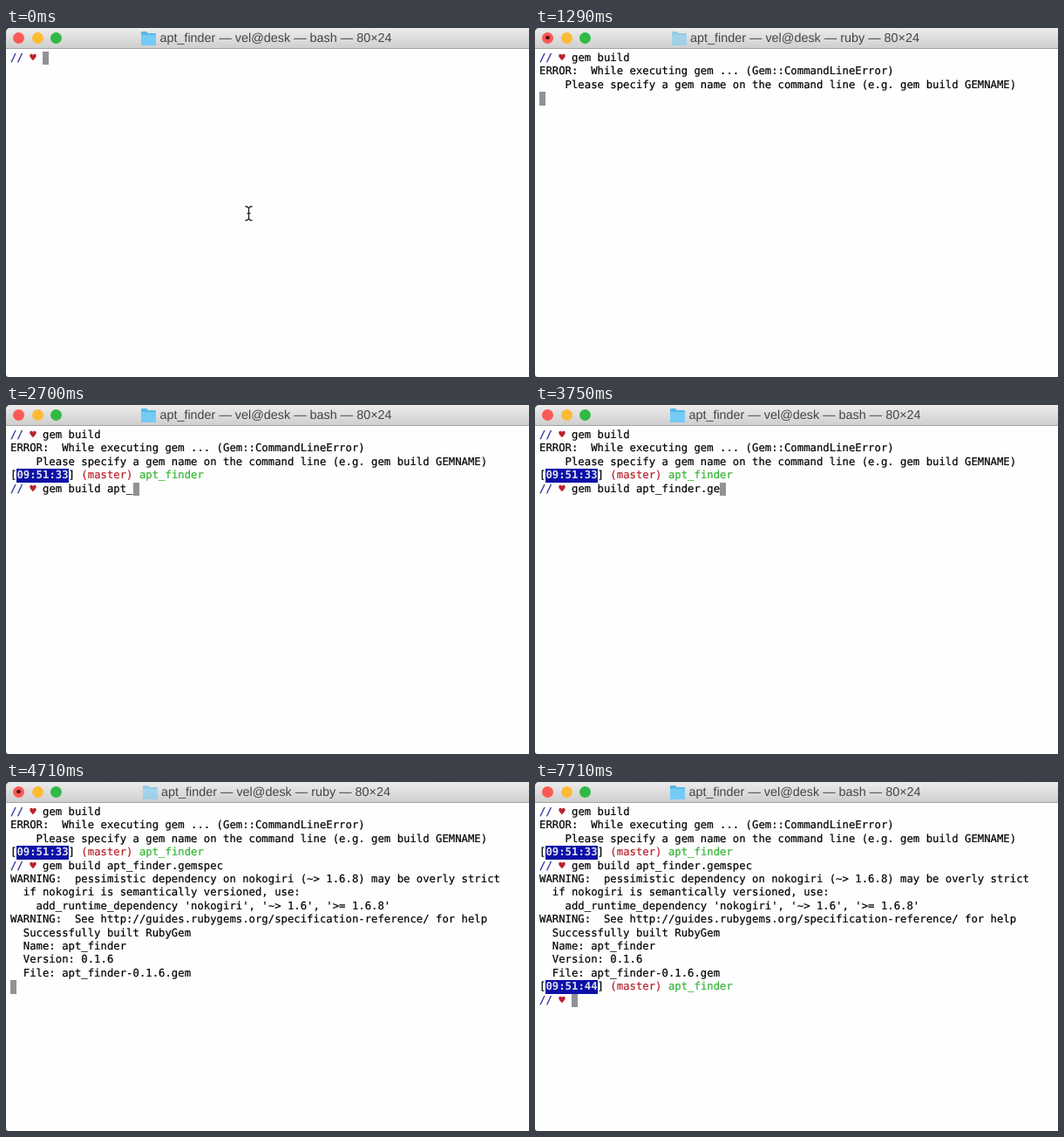
Write an HTML page that moves like this. It is 600 px wide and 400 px high and loops after 8000 ms.

```html
<!DOCTYPE html>
<html lang="en">
<head>
<meta charset="utf-8">
<title>Terminal</title>
<style>
  html, body { margin: 0; width: 100%; height: 100%; overflow: hidden; background: #3c3c3c; }
  #window {
    position: absolute; width: 600px; height: 400px; overflow: hidden;
    background: #fefefe; border-radius: 5px 0 0 3px; text-rendering: geometricPrecision;
  }
  #bar {
    height: 24px; box-sizing: border-box; border-bottom: 1px solid #a4a4a4;
    background: linear-gradient(#ececec, #cfcfcf);
  }
  #bar i { position: absolute; top: 4.5px; width: 13px; height: 13px; border-radius: 50%; }
  #close::after {
    content: ""; position: absolute; left: 4.25px; top: 4.25px;
    width: 4.5px; height: 4.5px; border-radius: 50%; background: #5a0f0c; opacity: 0;
  }
  .busy #close::after { opacity: 1; }
  #title {
    position: absolute; left: 0; top: 0; width: 598px; height: 23px;
    display: flex; justify-content: center; align-items: center; gap: 4px;
    font: 14.4px "Liberation Sans", Arial, sans-serif; color: #444; white-space: pre;
  }
  .busy #title svg { opacity: .55; }
  #screen {
    position: absolute; left: 5px; top: 27px; margin: 0; color: #000;
    font: 12.29px/15.4px "DejaVu Sans Mono", monospace; -webkit-text-stroke: .2px;
  }
  .slash { color: #2a2a9c; }
  .red { color: #b8222a; }
  .green { color: #32b432; }
  .clock, .cursor { display: inline-block; height: 15.4px; vertical-align: top; }
  .clock { background: #0c10a8; color: #e2e2e6; font-weight: bold; -webkit-text-stroke: 0; }
  .cursor { width: 1ch; background: #929296; }
  #pointer { position: absolute; left: 273px; top: 203px; }
</style>
</head>
<body>
<div id="window">
  <div id="bar">
    <i id="close" style="left:8px;background:#fb5a54"></i>
    <i style="left:29.5px;background:#fdbb35"></i>
    <i style="left:50.5px;background:#2fba44"></i>
    <div id="title">
      <svg width="17" height="16">
        <path d="M0 1q0-1 1-1h5l2 2h8q1 0 1 1v12q0 1-1 1H1q-1 0-1-1z" fill="#58b8e6"/>
        <path d="M0 4h17v11q0 1-1 1H1q-1 0-1-1z" fill="#74cbf5"/>
      </svg>
      <span id="name"></span>
    </div>
  </div>
  <pre id="screen"></pre>
  <svg id="pointer" width="11" height="19" fill="none" stroke="#222" stroke-width="1.3">
    <path d="M1.5 1.5q4 0 4 3v10q0 3-4 3M9.5 1.5q-4 0-4 3v10q0 3 4 3M3.5 9.5h4"/>
  </svg>
</div>
<script>
const LOOP = 8000;
const $ = id => document.getElementById(id);
const span = (cls, text) => `<span class="${cls}">${text}</span>`;

const prompt = `${span('slash', '//')} ${span('red', '♥')} `;
const status = clock =>
  `[${span('clock', clock)}] ${span('red', '(master)')} ${span('green', 'apt_finder')}\n`;
const type = (text, times) => times.map((at, i) => [at, text[i]]);

const error = `ERROR:  While executing gem ... (Gem::CommandLineError)
    Please specify a gem name on the command line (e.g. gem build GEMNAME)
`;
const report = `WARNING:  pessimistic dependency on nokogiri (~> 1.6.8) may be overly strict
  if nokogiri is semantically versioned, use:
    add_runtime_dependency 'nokogiri', '~> 1.6', '>= 1.6.8'
WARNING:  See http://guides.rubygems.org/specification-reference/ for help
  Successfully built RubyGem
  Name: apt_finder
  Version: 0.1.6
  File: apt_finder-0.1.6.gem
`;

// Each entry: time in ms, text appended to the screen
const events = [
  [0, prompt],
  ...type('gem build', [300, 360, 390, 450, 510, 540, 600, 660, 690]),
  [870, '\n'],
  [1290, error],
  [1320, status('09:51:33') + prompt],
  [1740, 'gem build'],
  ...type(' apt_find', [2010, 2400, 2460, 2550, 2700, 2820, 2880, 2940, 3030]),
  ...type('er', [3270, 3300]),
  ...type('.gemspec ', [3600, 3660, 3720, 3780, 3840, 3900, 3960, 3990, 4320]),
  [4470, '\n'],
  [4680, report],
  [4740, status('09:51:44') + prompt],
];

const within = (t, from, to) => t >= from && t < to;
let shown = '';

function draw() {
  const t = performance.now() % LOOP;
  const busy = within(t, 1050, 1500) || within(t, 4500, 4770);
  const html = events.filter(([at]) => at <= t).map(e => e[1]).join('') + span('cursor', '');
  if (html !== shown) $('screen').innerHTML = shown = html;
  $('name').textContent = `apt_finder — vel@desk — ${busy ? 'ruby' : 'bash'} — 80×24`;
  $('window').className = busy ? 'busy' : '';
  $('pointer').style.display = t < 300 ? '' : 'none';
  requestAnimationFrame(draw);
}
draw();
</script>
</body>
</html>
```
